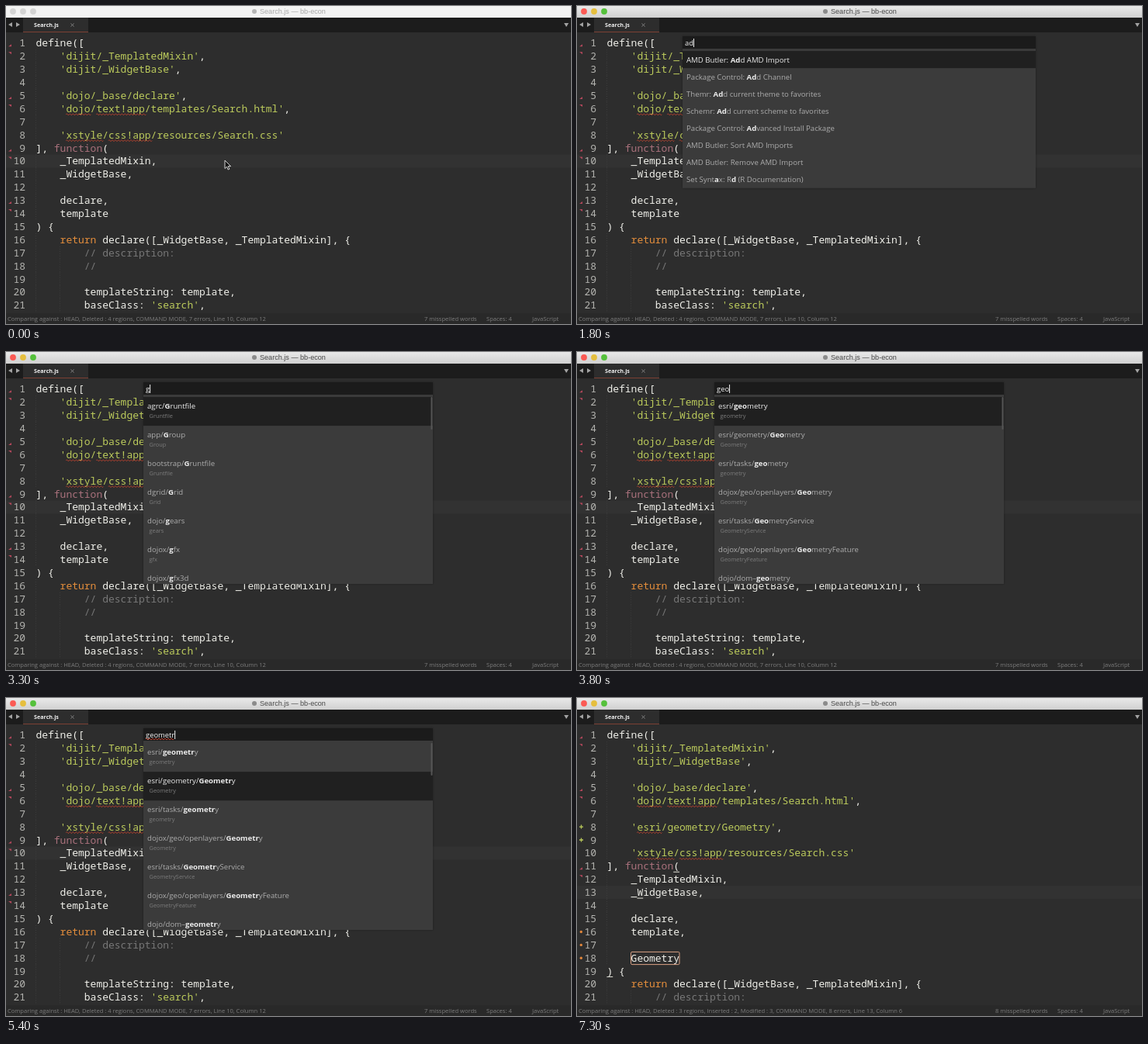
An HTML page that plays this animation: 728x410 px, repeating every 7.4 s.

```html
<!DOCTYPE html>
<html lang="en">
<head>
<meta charset="utf-8">
<title>Adding an AMD import</title>
<style>
  html, body { margin: 0; width: 100%; height: 100%; overflow: hidden; background: #2d2d2d; }
  svg { display: block; width: 728px; height: 410px; }
  text { white-space: pre; }
  .code { font: 500 13px "Noto Sans Mono", monospace; fill: #f0f0ea; }
  .number { font: 13px "Noto Sans Mono", monospace; fill: #b4b4b0; text-anchor: end; }
  .string { fill: #bccb5c; }
  .keyword { fill: #e58e3c; }
  .function { fill: #a9717c; }
  .comment { fill: #777; }
  .title { font: 9.1px "Liberation Sans", Arial, sans-serif; }
  .tab { font: 700 7.2px "Open Sans", sans-serif; fill: #eee; }
  .status { font: 7.57px "Open Sans", sans-serif; fill: #7d7d7d; }
  .item { font: 500 9.65px "Open Sans", sans-serif; fill: #adadad; }
  .item.on { fill: #ececec; }
  .match { font-weight: 700; fill: #ededed; }
  .hint { font: 7.4px "Open Sans", sans-serif; fill: #7c7c7c; }
  .input { font: 500 9.4px "Open Sans", sans-serif; fill: #f2f2f2; }
</style>
</head>
<body>
<svg id="stage" viewBox="0 0 728 410"></svg>
<script>
const LOOP = 7400;
const ROW = 16.9, FIRST_BASELINE = 52.3, CODE_X = 38.4, CHAR = 7.8;
const stage = document.getElementById('stage');
const start = performance.now();

const head = [
  'define([', "    'dijit/_TemplatedMixin',", "    'dijit/_WidgetBase',", '',
  "    'dojo/_base/declare',", "    'dojo/text!app/templates/Search.html',", ''
];
const css = "    'xstyle/css!app/resources/Search.css'";
const params = ['], function(', '    _TemplatedMixin,', '    _WidgetBase,', '', '    declare,'];
const tail = [
  ') {', '    return declare([_WidgetBase, _TemplatedMixin], {',
  '        // description:', '        //', '',
  '        templateString: template,', "        baseClass: 'search',"
];
const before = [...head, css, ...params, '    template', ...tail];
const after = [
  ...head, "    'esri/geometry/Geometry',", '', css,
  ...params, '    template,', '', '    Geometry', ...tail
].slice(0, 21);

// Asterisks enclose the letters that match the query.
const commands = [
  ':$ – EOF', ':0 – BOF', ':e – Revert', ':w – Save',
  'AMD Butler: Add AMD Import', 'AMD Butler: Refresh Available Imports',
  'AMD Butler: Remove AMD Import', 'AMD Butler: Sort AMD Imports',
  'ANF: Copy Current File', 'ANF: Delete Current File', 'ANF: Delete File'
];
const addCommands = [
  'AMD Butler: *Add A*MD Import', 'Package Control: *Add* Ch*a*nnel',
  'Themr: *Add* current theme to f*a*vorites', 'Schemr: *Add* current scheme to f*a*vorites',
  'Package Control: *Ad*vance*d* Inst*a*ll Package', 'AMD Butler: Sort AMD Imports',
  'AMD Butler: Remove AMD Import', 'Set Synt*a*x: R*d* (R *D*ocument*a*tion)'
];
const modules = [
  'agrc/*G*runtfile', 'app/*G*roup', 'bootstrap/*G*runtfile', 'dgrid/*G*rid',
  'dojo/*g*ears', 'dojox/*g*fx', 'dojox/*g*fx3d'
];
const geometryModules = [
  'esri/*geometr*y', 'esri/geometry/*Geometr*y', 'esri/tasks/*geometr*y',
  'dojox/geo/openlayers/*Geometr*y', 'esri/tasks/*Geometr*yService',
  'dojox/geo/openlayers/*Geometr*yFeature', 'dojo/dom–*geometr*y'
];

// Each step changes some of the state from its time on.
const steps = [
  [0, { active: false, mouse: true, panel: '', query: '', picked: 0, inserted: false, diffed: false, line: 10, column: 12 }],
  [300, { active: true }],
  [1200, { panel: 'commands' }],
  [1700, { query: 'a', mouse: false }],
  [1800, { query: 'ad' }],
  [1900, { query: 'add' }],
  [2000, { query: 'add ' }],
  [2200, { query: 'add a' }],
  [2400, { panel: '', query: '' }],
  [2900, { panel: 'modules' }],
  ...[...'geometr'].map((_, i) => [3300 + i * 200, { query: 'geometr'.slice(0, i + 1) }]),
  [5200, { picked: 1 }],
  [5800, { panel: '', inserted: true, line: 12 }],
  [6200, { diffed: true }],
  [6700, { line: 13, column: 6 }]
];

const rect = (x, y, w, h, fill, extra = '') =>
  `<rect x="${x}" y="${y}" width="${w}" height="${h}" fill="${fill}" ${extra}/>`;
const text = (x, y, cls, content, extra = '') =>
  `<text x="${x}" y="${y}" class="${cls}" ${extra}>${content}</text>`;
const path = (d, fill, extra = '') => `<path d="${d}" fill="${fill}" ${extra}/>`;
const dot = (x, y, r, fill) => `<circle cx="${x}" cy="${y}" r="${r}" fill="${fill}"/>`;
const baseline = line => FIRST_BASELINE + (line - 1) * ROW;
const columnX = column => CODE_X + column * CHAR;

const pen = document.createElement('canvas').getContext('2d');
function inputWidth(content) {
  pen.font = '500 9.4px "Open Sans", sans-serif';
  return pen.measureText(content).width;
}

function squiggle(x, y, width) {
  const waves = Math.round(width / 4);
  return path(`M${x} ${y}` + 'q1 -2 2 0t2 0'.repeat(waves), 'none', 'stroke="#d0452f" stroke-width=".9"');
}

function highlight(line) {
  return line.replace(/'[^']*'|\/\/.*|\bfunction\b|\breturn\b/g, token => {
    const cls = token[0] === "'" ? 'string' : token[0] === '/' ? 'comment'
      : token === 'return' ? 'keyword' : 'function';
    return `<tspan class="${cls}">${token}</tspan>`;
  });
}

function chrome({ active }) {
  const lights = active ? ['#fb5a54', '#e6bf3e', '#55c13b'] : ['#d4d4d4', '#d4d4d4', '#d4d4d4'];
  return rect(0, 0, 728, 15, active ? 'url(#bar)' : '#f3f3f3')
    + lights.map((color, i) => dot(9 + i * 13, 7, 3.9, color)).join('')
    + dot(320, 7, 3, active ? '#8b8b8b' : '#b5b5b5')
    + text(327, 10.3, 'title', 'Search.js — bb-econ', `fill="${active ? '#484848' : '#a9a9a9'}"`)
    + rect(0, 15, 728, 19, '#1c1c1c')
    + rect(22, 15, 84, 19, '#2d2d2d')
    + rect(22, 33, 84, 1, '#7d4034')
    + text(36, 26.7, 'tab', 'Search.js')
    + path('M83.500 22.500l4 4m0 -4l-4 4', 'none', 'stroke="#858585"')
    + path('M8 21v6l-5 -3zM13 21v6l5 -3zM719 22h6l-3 5z', '#a2a2a2');
}

function gutter({ diffed }) {
  const deletions = diffed ? [1, 5, 11] : [1, 5, 9, 13];
  let marks = deletions.map(line => {
    const y = baseline(line);
    return path(`M3 ${y}l4 -3v3zM3 ${y + 7}l4 3v-3z`, '#b5485c');
  }).join('');
  if (!diffed) return marks;
  for (const line of [8, 9]) {
    marks += path(`M3 ${baseline(line) - 4.500}h5m-2.500 -2.500v5`, 'none', 'stroke="#b9c95a" stroke-width="1.300"');
  }
  for (const line of [16, 17, 18]) marks += dot(5.3, baseline(line) - 4.3, 1.7, '#e2863a');
  return marks;
}

function editor(state) {
  const lines = state.inserted ? after : before;
  let out = rect(0, baseline(state.line) - 12.9, 728, ROW, '#323232');
  let indent = 0;
  lines.forEach((line, i) => {
    const y = baseline(i + 1);
    if (line) indent = line.search(/\S/);
    for (let column = 0; column < indent; column += 4) {
      out += path(`M${columnX(column)} ${y - 12.9}v${ROW}`, 'none', 'stroke="#454545" stroke-width=".8" stroke-dasharray="1 2"');
    }
    out += text(25, y, 'number', i + 1);
    if (!line) return;
    out += text(columnX(indent), y, 'code', highlight(line.trim()));
    for (const word of line.matchAll(/dojo(?=\/text)|text!app|xstyle|css!app|esri/g)) {
      out += squiggle(columnX(word.index), y + 3, word[0].length * CHAR);
    }
  });
  return out + gutter(state) + (state.line === 13 ? marks() : '');
}

function marks() {
  const underline = (line, column) => rect(columnX(column), baseline(line) + 2.5, CHAR, 1, '#dcdcd2');
  return underline(11, 11) + underline(19, 0) + underline(13, 5)
    + rect(69.5, baseline(18) - 12.2, 62.5, 16.2, 'none', 'rx="1.500" stroke="#d9a184"');
}

function status({ line, column, diffed }) {
  const regions = diffed ? 'Deleted : 3 regions, Inserted : 2, Modified : 3' : 'Deleted : 4 regions';
  const count = diffed ? 8 : 7;
  return rect(0, 396, 728, 14, '#292929')
    + text(2, 406.4, 'status', `Comparing against : HEAD, ${regions}, COMMAND MODE, ${count} errors, Line ${line}, Column ${column}`)
    + text(539, 406.4, 'status', `${count} misspelled words`)
    + text(619, 406.4, 'status', 'Spaces: 4')
    + text(678, 406.4, 'status', 'JavaScript');
}

function label(item, query) {
  let left = query.replace(/ /g, '').length;
  return item.split('*').map((part, i) => {
    if (i % 2 === 0) return part;
    let end = 0;
    while (end < part.length && left > 0) if (part[end++] !== ' ') left--;
    return `<tspan class="match">${part.slice(0, end)}</tspan>${part.slice(end)}`;
  }).join('');
}

function panel({ panel, query, picked }) {
  if (!panel) return '';
  const isModules = panel === 'modules';
  const [x, width, pitch] = isModules ? [177, 373, 37.1] : [136, 455, 22.1];
  const items = isModules ? (query.length > 1 ? geometryModules : modules)
    : (query ? addCommands : commands);
  const bottom = Math.min(299, 58 + items.length * pitch);
  let list = '';
  items.forEach((item, i) => {
    const y = 58 + i * pitch;
    const on = i === picked;
    if (on) list += rect(x, y, width, pitch, '#202020');
    list += text(x + 5, y + 14.5, on ? 'item on' : 'item', label(item, query));
    if (isModules) list += text(x + 7.5, y + 26.6, 'hint', item.replace(/\*/g, '').split('/').pop());
    if (item.endsWith('Save')) list += text(574, y + 13.5, 'hint', '⌘S');
  });
  if (isModules) list += rect(547.5, 58, 2, 42, '#555', 'rx="1"');
  const end = x + 3 + inputWidth(query);
  return rect(x, 39, width, bottom - 39, '#3a3a3a', 'filter="url(#shadow)"')
    + rect(x, 39, width, 16, '#1b1b1b')
    + `<clipPath id="list">${rect(x, 55, width, bottom - 55, '#000')}</clipPath>`
    + `<g clip-path="url(#list)">${list}</g>`
    + text(x + 3, 51.2, 'input', query)
    + (isModules && query.length > 3 ? squiggle(x + 3, 53, end - x - 3) : '')
    + rect(end, 42, 1, 11, '#f0f0f0');
}

const pointer = path('M282 199v10.500l2.500 -2.300l1.700 3.800l1.700 -.8l-1.700 -3.600h3.400z', '#111', 'stroke="#e8e8e8" stroke-width=".9"');
const defs = `<defs>
  <linearGradient id="bar" x2="0" y2="1"><stop stop-color="#e9e9e9"/><stop offset="1" stop-color="#d0d0d0"/></linearGradient>
  <filter id="shadow"><feDropShadow dx="0" dy="0" stdDeviation="1.5" flood-opacity=".35"/></filter>
</defs>`;

let shown = -1;
function render() {
  const time = (performance.now() - start) % LOOP;
  const reached = steps.filter(([at]) => at <= time);
  if (reached.length !== shown) {
    shown = reached.length;
    const state = Object.assign({}, ...reached.map(([, change]) => change));
    stage.innerHTML = defs + rect(0, 0, 728, 410, '#2d2d2d') + editor(state) + status(state)
      + chrome(state) + panel(state) + (state.mouse ? pointer : '');
  }
  requestAnimationFrame(render);
}
render();
</script>
</body>
</html>
```
